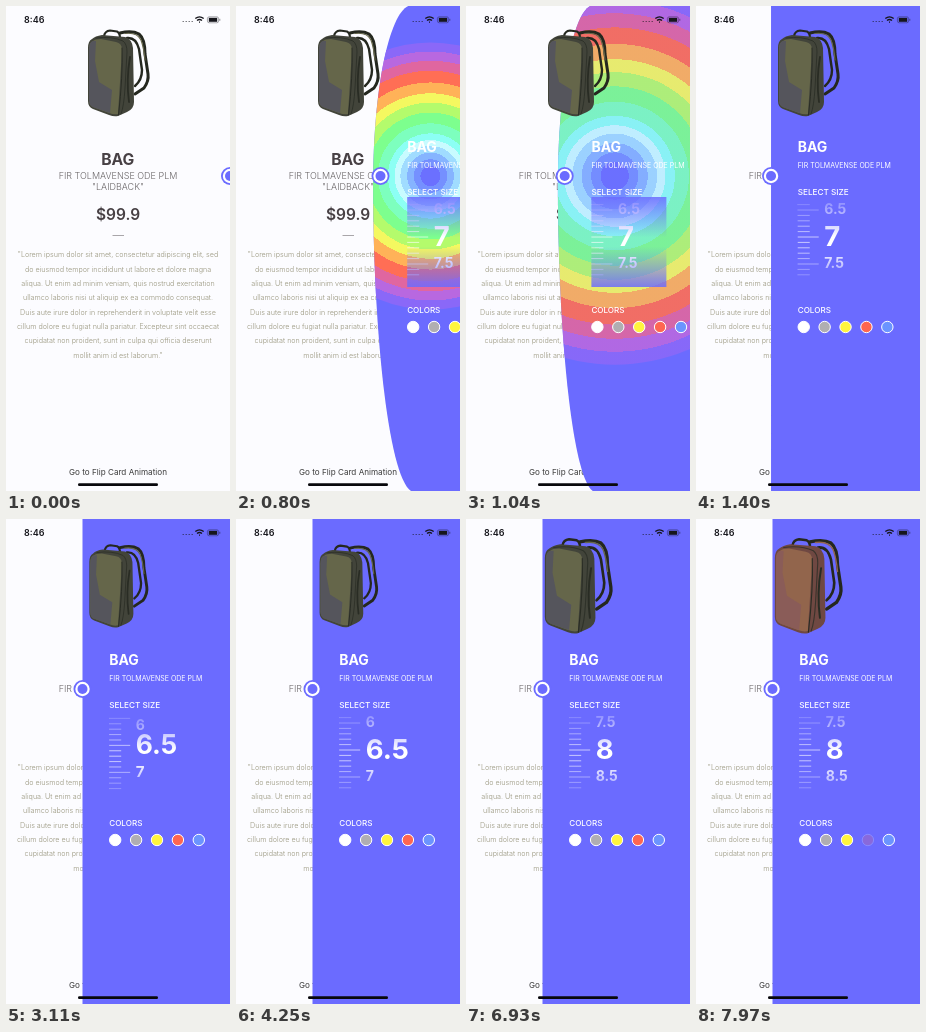
An HTML page that plays this animation: 224x485 px, repeating every 8 s.

```html
<!DOCTYPE html>
<html lang="en">
<head>
<meta charset="utf-8">
<title>Bag card</title>
<style>
  html, body { margin: 0; width: 100%; height: 100%; overflow: hidden; background: #fcfcff; }
  svg { display: block; width: 100vw; height: 100vh; font-family: Inter, Roboto, sans-serif; }
  .mid { text-anchor: middle; }
</style>
</head>
<body>
<svg viewBox="0 0 224 485">
  <defs>
    <radialGradient id="rings" gradientUnits="userSpaceOnUse" cx="0" cy="0" r="160"></radialGradient>
    <linearGradient id="wheelFade" x1="0" y1="0" x2="0" y2="1">
      <stop offset="0" stop-color="#6b6bff" stop-opacity=".85"/>
      <stop offset=".45" stop-color="#6b6bff" stop-opacity="0"/>
      <stop offset=".55" stop-color="#6b6bff" stop-opacity="0"/>
      <stop offset="1" stop-color="#6b6bff" stop-opacity=".85"/>
    </linearGradient>
    <clipPath id="panelClip"><path id="panelShape"/></clipPath>
  </defs>

  <rect width="224" height="485" fill="#fcfcff"/>
  <g class="mid">
    <text x="111.800" y="159" font-size="15.700" font-weight="700" fill="#474044">BAG</text>
    <g font-size="9" font-weight="300" fill="#6c686a">
      <text x="112" y="173">FIR TOLMAVENSE ODE PLM</text>
      <text x="112" y="184">"LAIDBACK"</text>
    </g>
    <text x="112" y="213.500" font-size="15.500" font-weight="600" fill="#474044">$99.9</text>
    <g id="blurb" font-size="7.170" font-weight="300" fill="#98957c"></g>
    <text x="112" y="469" font-size="8.150" fill="#3b3b3b">Go to Flip Card Animation</text>
  </g>
  <path d="M106.500 229.500H118" stroke="#a9a6aa"/>

  <g clip-path="url(#panelClip)">
    <rect width="224" height="485" fill="#6b6bff"/>
    <circle id="glow" r="160" fill="url(#rings)"/>
    <g id="content" fill="#fff">
      <text y="145.500" font-size="14" font-weight="700">BAG</text>
      <text y="162" font-size="7">FIR TOLMAVENSE ODE PLM</text>
      <text y="189" font-size="8.200" font-weight="500">SELECT SIZE</text>
      <g id="ticks" stroke="#fff" stroke-width=".8" opacity=".8"></g>
      <g id="sizes" font-weight="700"></g>
      <rect y="191" width="75" height="90" fill="url(#wheelFade)"/>
      <text y="307" font-size="8.100" font-weight="500">COLORS</text>
      <g id="swatches" stroke="#fff"></g>
    </g>
  </g>

  <g id="handle">
    <circle r="9" fill="#6b6bff"/>
    <circle r="7.200" fill="#fff"/>
    <circle r="5" fill="#6b6bff"/>
  </g>

  <g id="bag" stroke-linecap="round" stroke-linejoin="round">
    <g fill="none" stroke="#25281f">
      <path d="M114 27Q126 24 133 28Q139 33 139 48L142 68Q143 75 138 82L129 88" stroke-width="3"/>
      <path d="M121 32Q130 31 133 43L136 64Q136 74 129 80" stroke-width="2.400"/>
      <path d="M98 30Q99 25 104 24.500L111 25.500Q114 27 114 32" stroke-width="2.200"/>
    </g>
    <path id="bagStrap" d="M119 27.500Q131 26 135 34Q138 42 139 54" fill="none" stroke-width="1.200"/>
    <path id="bagSide" d="M86 33Q89 30 96 29L119 31Q126 33 127 42L128 96Q128 103 121 106L112 110Q108 111 103 109L87 103Q82 101 82 95V42Q82 35 86 33Z"/>
    <path id="bagFront" d="M87 35Q89 33 95 33L110 36Q116 37 116 44L112 108Q108 109 103 107L88 101.500Q83 100 83 94V43Q83 36 87 35Z"/>
    <path id="bagShade" d="M83 44Q83 36 87 35L90 35L89 55L93 76L106 84L104 107L88 101.500Q83 100 83 94Z"/>
    <g fill="none" stroke="#292c24">
      <path d="M116 42Q117 70 112.500 109"/>
      <path d="M90 32Q106 30 117 35Q121 38 121 46L119 82Q118 100 115 108" opacity=".75"/>
      <path d="M124 51Q120 74 123 96" stroke-width="1.800"/>
    </g>
  </g>

  <text x="18" y="17" font-size="9" font-weight="600" fill="#16161c">8:46</text>
  <g fill="none" stroke="#16161c">
    <path d="M176.500 15.500H187" stroke-width="1.200" stroke-dasharray="1.500 1.500" opacity=".55"/>
    <path d="M189.300 12.600Q193.500 9.200 197.700 12.600M191 14.500Q193.500 12.500 196 14.500M193 16.200H194" stroke-width="1.300"/>
    <rect x="201.400" y="10.800" width="11.200" height="6" rx="1.800" stroke-width=".6" opacity=".6"/>
    <path d="M202.800 13.800H211.200" stroke-width="4"/>
    <path d="M213.800 12.800V14.800" stroke-width=".8" opacity=".6"/>
  </g>
  <rect x="72" y="477.300" width="80" height="2.700" rx="1.350" fill="#08080c"/>
</svg>
<script>
const LOOP = 8000, ROW = 27, CENTER_Y = 230;
const $ = id => document.getElementById(id);

function add(parent, tag, attrs, text) {
  const el = document.createElementNS('http://www.w3.org/2000/svg', tag);
  set(el, attrs);
  if (text !== undefined) el.textContent = text;
  return $(parent).appendChild(el);
}
function set(el, attrs) {
  for (const key in attrs) el.setAttribute(key, attrs[key]);
}
const clamp = x => Math.max(0, Math.min(1, x));
const ramp = (t, from, to) => clamp((t - from) / (to - from));
const easeOut = (p, power = 1.5) => 1 - (1 - p) ** power;
const smooth = p => p * p * (3 - 2 * p);

`"Lorem ipsum dolor sit amet, consectetur adipiscing elit, sed
do eiusmod tempor incididunt ut labore et dolore magna
aliqua. Ut enim ad minim veniam, quis nostrud exercitation
ullamco laboris nisi ut aliquip ex ea commodo consequat.
Duis aute irure dolor in reprehenderit in voluptate velit esse
cillum dolore eu fugiat nulla pariatur. Excepteur sint occaecat
cupidatat non proident, sunt in culpa qui officia deserunt
mollit anim id est laborum."`.split('\n').forEach((line, i) =>
  add('blurb', 'text', { x: 112, y: 251.3 + i * 14.35 }, line));

// Hard-edged colour rings: [outer radius, colour]
const rings = [[12, '#6b70ff'], [20, '#7590ff'], [28, '#86b4ff'], [36, '#a0dcff'],
  [43, '#c8fbff'], [51, '#8cfff4'], [63, '#7dffbe'], [76, '#7dff8e'], [88, '#b4fb6c'],
  [99, '#f4f860'], [112, '#ffb258'], [126, '#ff6e55'], [138, '#e066a0'],
  [149, '#b868e0'], [160, '#8a68f8']];
let inner = 0;
for (const [outer, color] of rings) {
  for (const r of [inner, outer]) add('rings', 'stop', { offset: r / 160, 'stop-color': color });
  inner = outer;
}

const ticks = [];
for (let n = -25; n <= 30; n++) {
  ticks.push({ n, el: add('ticks', 'line', { x1: 0, x2: n % 5 ? 12 : 21 }) });
}
const sizes = [];
for (let size = 5.5; size <= 9.5; size += .5) {
  sizes.push({ size, el: add('sizes', 'text', { x: 26.5 }, size) });
}
const swatches = ['#ffffff', '#b0aeb2', '#fff53d', '#ff6650', '#6b94ff'].map((fill, i) =>
  add('swatches', 'circle', { cx: 6 + i * 20.9, cy: 321, r: 5.7, fill }));

// [start, end, size reached]
const spins = [[2910, 3580, 6], [3820, 4250, 6.5], [4790, 5230, 7.5], [5960, 6600, 8]];
function sizeAt(t) {
  let value = 7;
  for (const [from, to, target] of spins) value += (target - value) * easeOut(ramp(t, from, to));
  return value;
}

function drawPanel(t) {
  const p = ramp(t, 500, 1300);
  const x = 224 - 150 * easeOut(p, 1.6) + 2.5 * easeOut(ramp(t, 1300, 1770), 2.2);
  const bend = Math.sin(Math.PI * p);
  const mid = x - 8 * bend, top = x + 30 * bend, bottom = x + 33 * bend;
  set($('panelShape'), {
    d: `M${top} 0C${mid + 18 * bend} 8 ${mid} 80 ${mid} 180C${mid} 320 ${mid + 16 * bend} 470 ${bottom} 485H420V0Z`
  });
  set($('handle'), { transform: `translate(${x} 170)` });
  set($('content'), { transform: `translate(${x + 26.7} 0)` });

  const shown = ramp(t, 500, 560) * (1 - ramp(t, 1020, 1240));
  const spread = .45 + .55 * ramp(t, 500, 930) + .5 * ramp(t, 930, 1240);
  set($('glow'), { transform: `translate(${x + 50} 170) scale(${spread})`, opacity: shown });
}

function drawWheel(value) {
  for (const { n, el } of ticks) {
    const y = 231 + n * ROW / 5 - (value - 7) * 2 * ROW;
    set(el, { y1: y, y2: y, opacity: y > 197 && y < 272 ? 1 : 0 });
  }
  for (const { size, el } of sizes) {
    const d = (size - value) * 2, far = Math.abs(d);
    // rows past the rim fold back behind the wheel
    const fold = far > 1 ? 1 - (far - 1) * .6 : far;
    const font = 14 + 13.5 * (1 - smooth(clamp(far)));
    set(el, {
      y: CENTER_Y + Math.sign(d) * fold * ROW + font * .364,
      'font-size': font,
      opacity: 1 - ramp(far, 1.1, 1.5)
    });
  }
}

function drawBag(t, value) {
  const scale = 1 + (value - 7) * .1;
  set($('bag'), { transform: `translate(113.5 67.5) scale(${scale}) translate(-113.5 -67.5)` });
  const [front, side, shade] = t < 7160
    ? ['#65664a', '#42443a', '#55555c']
    : ['#92654c', '#6f4842', '#8a5c58'];
  set($('bagFront'), { fill: front });
  set($('bagSide'), { fill: side });
  set($('bagShade'), { fill: shade });
  set($('bagStrap'), { stroke: front });
}

function draw(t) {
  const value = sizeAt(t);
  drawPanel(t);
  drawWheel(value);
  drawBag(t, value);
  set(swatches[2], { opacity: 1 - .8 * (ramp(t, 7040, 7130) - ramp(t, 7130, 7300)) });
  set(swatches[3], { opacity: 1 - .8 * ramp(t, 7850, 7970) });
}

const start = performance.now();
function tick() {
  draw((performance.now() - start) % LOOP);
  requestAnimationFrame(tick);
}
tick();
</script>
</body>
</html>
```
